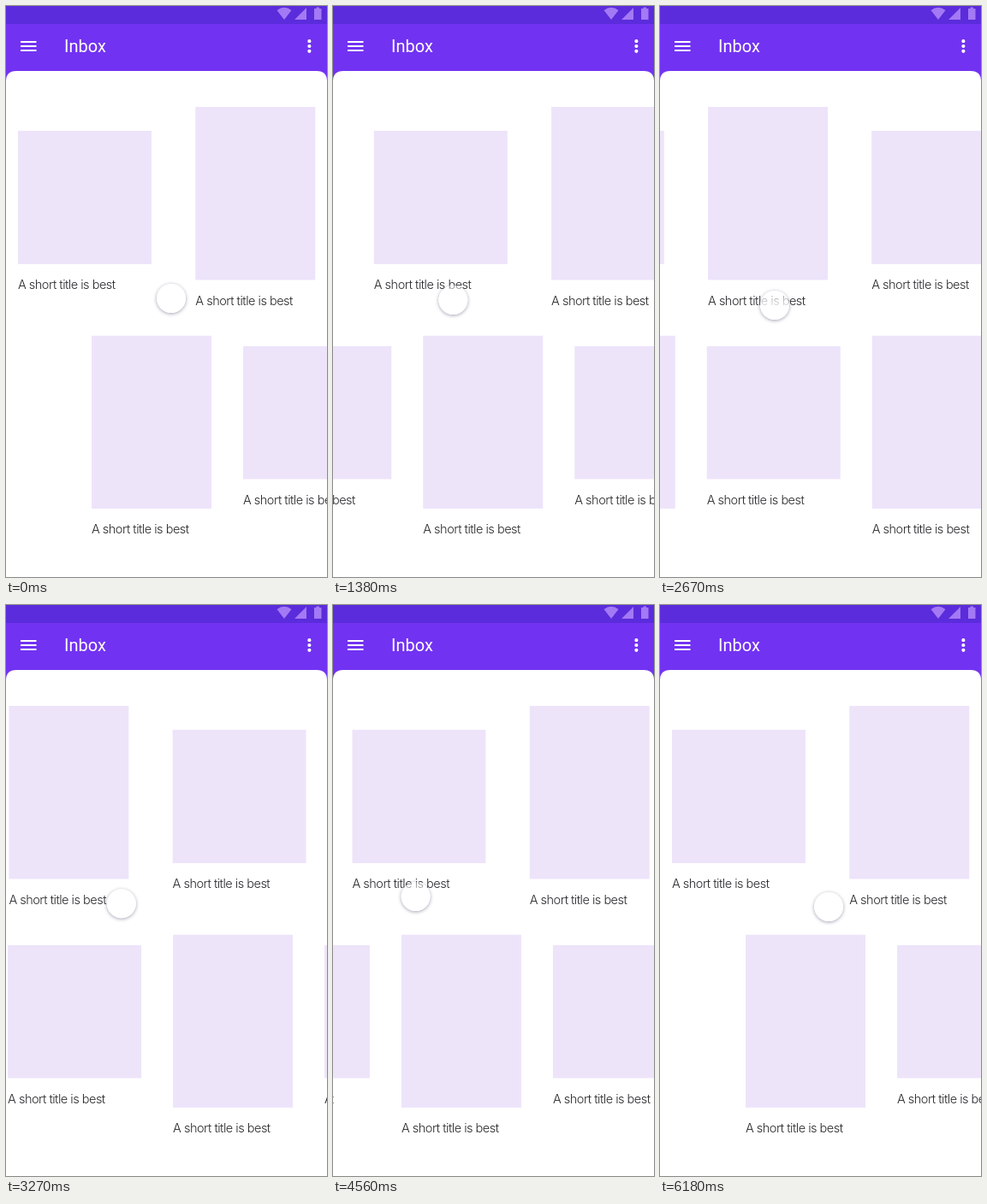
An HTML page with a canvas for the animation above (6270 ms loop, 375 by 668 pixels).

```html
<!DOCTYPE html>
<html lang="en">
<head>
<meta charset="utf-8">
<title>Inbox carousel</title>
<style>
  html, body { margin: 0; width: 100%; height: 100%; overflow: hidden; background: #fff; }
  canvas { display: block; }
</style>
</head>
<body>
<canvas id="stage" width="375" height="668"></canvas>
<script>
const ctx = document.getElementById('stage').getContext('2d');
const LOOP = 6270;

// Each drag moves the list 1:1 with the finger, then lets it coast to `end`.
const drags = [
  { start: 975,  stop: 1250, from: 320, to: 134,   base: 0,    end: 663,  tau: 279 },
  { start: 2250, stop: 2537, from: 286, to: 134,   base: 650,  end: 1015, tau: 96 },
  { start: 3550, stop: 3840, from: 135, to: 304.5, base: 1015, end: 354,  tau: 276 },
  { start: 4850, stop: 5130, from: 95,  to: 295,   base: 367,  end: 0,    tau: 120 }
];

// Finger moves between drags: start, stop, from x, to x
const moves = [[330, 930, 193, 320], [1270, 2170, 134, 286], [2600, 3500, 134, 135],
               [3840, 4600, 304.5, 95], [5150, 6200, 295, 197]];

const heights = [[0, 342], [330, 342], [930, 345], [1380, 344], [2160, 345], [2537, 350],
                 [3550, 349], [3840, 333], [4560, 341], [5130, 341], [6180, 353]];

const rows = [
  { x: 14,  period: 398.5, cards: [[0, 146, 156, 156], [207.3, 118, 140, 202.5]] },
  { x: 100, period: 370,   cards: [[0, 385.7, 140, 202.3], [177, 398, 156, 155.5]] }
];

const clamp = p => Math.min(1, Math.max(0, p));
const smooth = p => p * p * (3 - 2 * p);
const mix = (a, b, p) => a + (b - a) * p;
const dragX = (d, t) => mix(d.from, d.to, clamp((t - d.start) / (d.stop - d.start)) ** 2.2);

function fingerX(t) {
  const drag = drags.find(d => t >= d.start && t < d.stop);
  if (drag) return dragX(drag, t);
  const [a, b, from, to] = moves.filter(m => t >= m[0]).pop() || moves[0];
  return mix(from, to, smooth(clamp((t - a) / (b - a))));
}

function fingerY(t) {
  const i = heights.findIndex(h => h[0] > t);
  if (i < 0) return heights[heights.length - 1][1];
  const [a, b] = [heights[i - 1], heights[i]];
  return mix(a[1], b[1], smooth((t - a[0]) / (b[0] - a[0])));
}

function scrollAt(t) {
  const d = drags.filter(d => t >= d.start).pop();
  if (!d) return 0;
  const held = d.base + d.from - dragX(d, t);
  return t < d.stop ? held : mix(d.end, held, Math.exp((d.stop - t) / d.tau));
}

function fillPath(color, path) {
  ctx.fillStyle = color;
  ctx.fill(new Path2D(path));
}

function write(text, x, y, font, color, spacing) {
  ctx.font = font;
  ctx.letterSpacing = spacing;
  ctx.fillStyle = color;
  ctx.fillText(text, x, y);
}

function drawBars() {
  fillPath('#7232f2', 'M0 0H375V88H0Z');
  fillPath('#5a2cdb', 'M0 0H375V21H0Z');
  fillPath('#fff', 'M0 668V88Q0 76 12 76H363Q375 76 375 88V668Z');
  fillPath('#a479f5', 'M316.5 5Q325-1.5 333.5 5L325 16Z M337 16L351 2V16Z M360 3H362.5V1.5H366V3H368.5V16H360Z');
  fillPath('#fff', 'M17 41H35.5V43H17Z M17 46H35.5V48H17Z M17 51H35.5V53H17Z');
  ctx.beginPath();
  for (const y of [41.2, 47, 52.8]) {
    ctx.moveTo(356.5, y);
    ctx.arc(354.4, y, 2.1, 0, 7);
  }
  ctx.fill();
  write('Inbox', 68, 54, '20px Roboto, sans-serif', '#fff', '0px');
}

function drawCards(scroll) {
  for (const row of rows) {
    for (let page = 0; page < 4; page++) {
      for (const [dx, y, w, h] of row.cards) {
        const x = row.x + page * row.period + dx - scroll;
        if (x > 375 || x + w < 0) continue;
        ctx.fillStyle = '#ede4fa';
        ctx.fillRect(x, y, w, h);
        write('A short title is best', x, y + h + 29, '300 14.5px Inter, sans-serif', '#2b2b2e', '-0.5px');
      }
    }
  }
}

function drawFinger(x, y) {
  const r = 17;
  const disc = new Path2D();
  disc.arc(x, y, r, 0, 7);
  // The shadow is kept outside the translucent disc
  const outside = new Path2D('M0 0H375V668H0Z');
  outside.addPath(disc);
  ctx.save();
  ctx.clip(outside, 'evenodd');
  ctx.shadowColor = 'rgba(50,40,80,.45)';
  ctx.shadowBlur = 4;
  ctx.shadowOffsetY = 1;
  ctx.fillStyle = '#fff';
  ctx.fill(disc);
  ctx.restore();
  const shade = ctx.createLinearGradient(0, y - r, 0, y + r);
  shade.addColorStop(0, 'rgba(255,255,255,.45)');
  shade.addColorStop(.75, '#fff');
  ctx.fillStyle = shade;
  ctx.fill(disc);
}

function draw(now) {
  const t = now % LOOP;
  drawBars();
  drawCards(scrollAt(t));
  drawFinger(fingerX(t), fingerY(t));
  requestAnimationFrame(draw);
}
requestAnimationFrame(draw);
</script>
</body>
</html>
```
